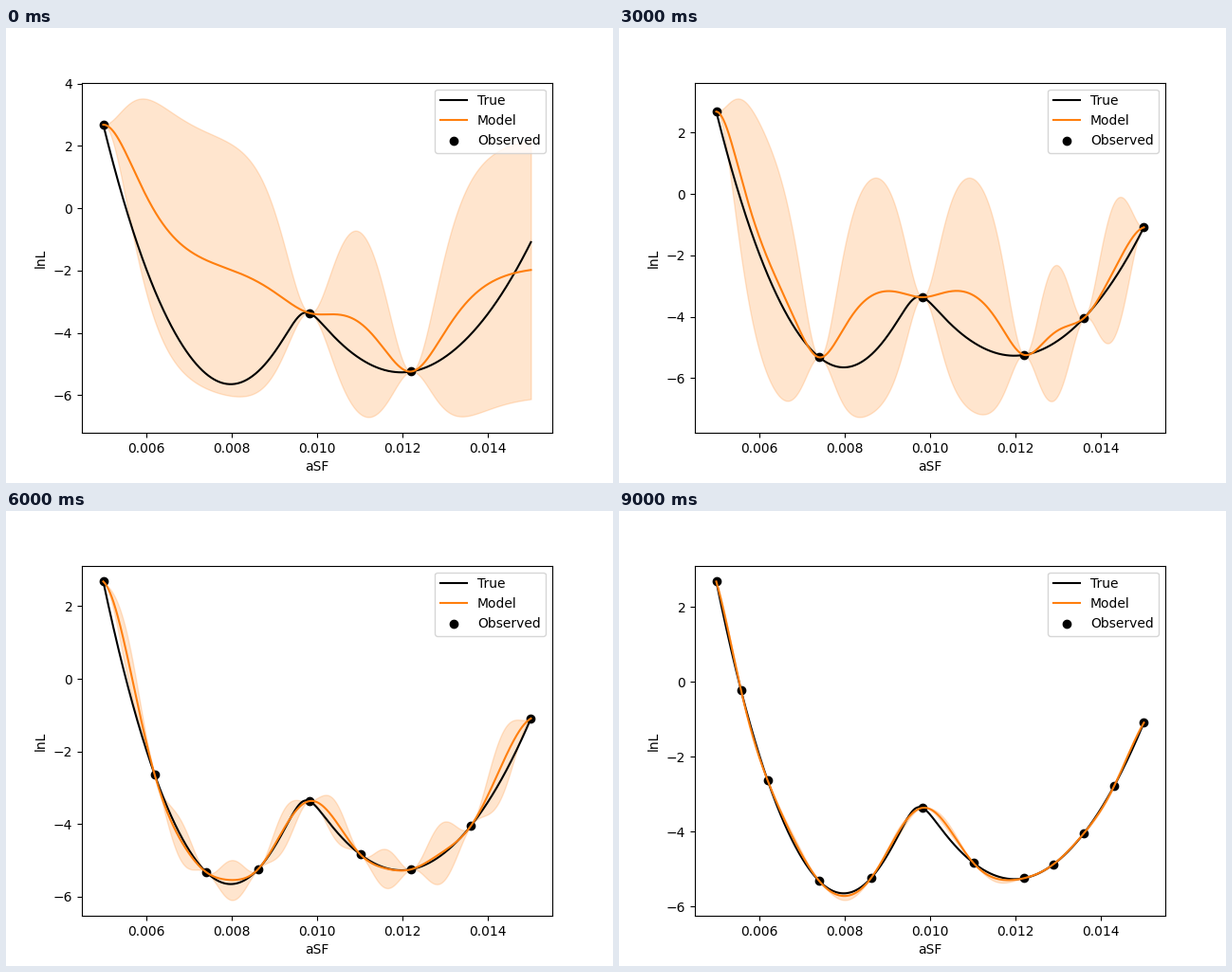
A matplotlib script that plays this animation: 640 by 480 pixels, repeating every 10000 ms.

```python
import numpy as np
import matplotlib.pyplot as plt
from matplotlib.animation import FuncAnimation

STEPS = 10
GRID = np.linspace(5, 15, 1001)  # thousandths of aSF


def valley(u, floor, curve, bump):
    return floor + (curve + bump * np.exp(-u**2 / 2)) * u**2


def true_lnl(x):
    """Two valleys joined by a soft minimum."""
    left = valley(x - 7.98, -5.65, 0.937, 0.08)
    right = valley(x - 11.97, -5.27, 0.455, 0.03)
    soft = 0.7
    return -soft * np.logaddexp(-left / soft, -right / soft)


def matern(a, b, rate):
    r = rate * np.abs(a[:, None] - b[None, :])
    return (1 + r + r**2 / 3) * np.exp(-r)


def predict(xs, step):
    """Gaussian process mean and variance on the grid."""
    # the kernel tightens once the left valley is found, then relaxes
    rate = np.interp(step, [1, 2, 5, 9], [2.32, 3.6, 2.5, 1.5])
    prior = np.interp(step, [0, 1, 2, 9], [4.15, 3.85, 4.35, 2.95])
    ys = true_lnl(xs)
    cov = matern(xs, xs, rate) + 1e-9 * np.eye(len(xs))
    cross = matern(GRID, xs, rate)
    pull = np.linalg.solve(cov, np.ones(len(xs)))
    base = pull @ ys / pull.sum()
    weights = np.linalg.solve(cov, cross.T).T
    mean = base + weights @ (ys - base)
    var = prior * (1 - np.sum(weights * cross, axis=1))
    return mean, np.clip(var, 0, None)


def explore():
    """Sample again and again where the model is least certain."""
    xs = np.array([5, 9.82, 12.2])
    history = []
    for step in range(STEPS):
        mean, var = predict(xs, step)
        history.append((xs, mean, var))
        xs = np.append(xs, GRID[np.argmax(var)])
    return history


history = explore()
fig, ax = plt.subplots(figsize=(6.4, 4.8), dpi=100)


def draw(step):
    xs, mean, var = history[step]
    x = GRID / 1000
    ax.clear()
    ax.plot(x, true_lnl(GRID), color="black", label="True")
    ax.plot(x, mean, color="C1", label="Model")
    ax.fill_between(x, mean - var, mean + var, color="C1", alpha=0.2)
    ax.scatter(xs / 1000, true_lnl(xs), color="black", label="Observed")
    ax.set_xlabel("aSF")
    ax.set_ylabel("lnL")
    ax.legend(loc="upper right")
    return []


anim = FuncAnimation(fig, draw, frames=STEPS, init_func=lambda: [],
                     interval=1000, repeat=True, repeat_delay=0)
plt.show()
```
